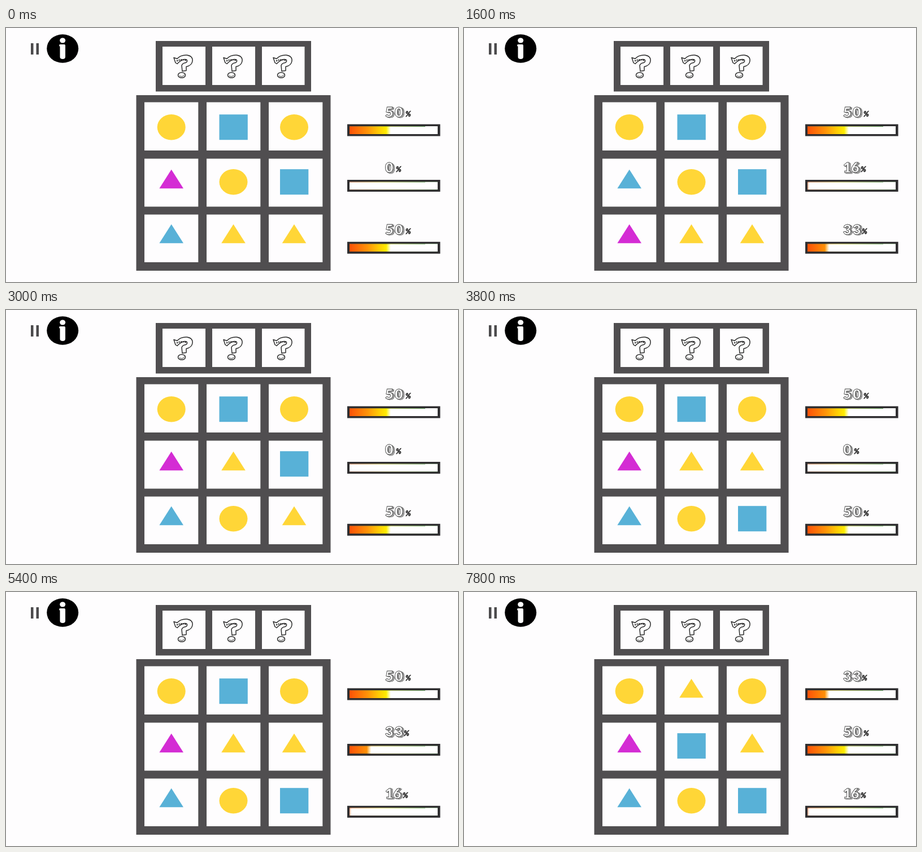
An HTML page for the animation above (8000 ms loop, 800x450 px).

```html
<!DOCTYPE html>
<html lang="en">
<head>
<meta charset="utf-8">
<title>Shape puzzle</title>
<style>
  html, body { margin: 0; width: 100%; height: 100%; overflow: hidden; background: #fefdfe; }
  svg { display: block; width: 800px; height: 450px; }
  .digit { font: 900 25px Lato, "Open Sans", sans-serif; stroke: #4a4a4a; stroke-width: .9px; fill: #fff; }
  .side { fill: #ddd; stroke: #666; stroke-width: .7px; }
  .sign { font: italic 900 12.5px Lato, "Open Sans", sans-serif; fill: #222; stroke: #222; stroke-width: .3px; }
  .ink { fill: #fff; stroke: #2c2c2c; stroke-width: 1.5px; stroke-linejoin: round; }
  .hatch { fill: none; stroke: #333; stroke-width: 2px; stroke-dasharray: 2.4 1.3; }
</style>
</head>
<body>
<svg id="stage" viewBox="0 0 800 450">
  <defs>
    <linearGradient id="heat" gradientUnits="userSpaceOnUse" x1="608" x2="764" y1="0" y2="0">
      <stop offset="0" stop-color="#fc5208"/>
      <stop offset=".2" stop-color="#ff9208"/>
      <stop offset=".33" stop-color="#ffca05"/>
      <stop offset=".43" stop-color="#fff200"/>
      <stop offset=".6" stop-color="#c8ee20"/>
      <stop offset="1" stop-color="#20a020"/>
    </linearGradient>
    <linearGradient id="fade">
      <stop offset="0" stop-color="#fff" stop-opacity="0"/>
      <stop offset=".04" stop-color="#fff"/>
    </linearGradient>
    <linearGradient id="rim" gradientUnits="userSpaceOnUse" x1="608" x2="744" y1="0" y2="0">
      <stop offset="0" stop-color="#c85a20"/>
      <stop offset=".4" stop-color="#b9b41c"/>
      <stop offset="1" stop-color="#1f7a1f"/>
    </linearGradient>
    <g id="query">
      <path class="ink" d="M-17 -15L-11 -13Q-5 -20 6 -19.5Q17 -18 16 -9Q15 -1 5 1L5 8L-2 9L-3 -1Q-2 -5 4 -6Q8 -8 6 -11Q1 -14 -8 -7L-11 -4L-14 -6Z"/>
      <path class="hatch" d="M-12 -9Q-4 -13 5 -10"/>
      <ellipse class="ink" cx="-3" cy="16" rx="6.5" ry="4.8"/>
      <path d="M-7 17Q-2 21 2 15" fill="none" stroke="#2c2c2c"/>
    </g>
  </defs>
</svg>
<script>
const LOOP = 8000, LAG = 200;
const COLORS = { y: '#ffd637', b: '#58b1d7', m: '#d42cd4' };
const COLS = [292.7, 402.5, 510], ROWS = [175.7, 272.7, 369.7], BARS = [181, 279.5, 389.3];
const START = ['yC', 'bS', 'yC', 'mT', 'yC', 'bS', 'bT', 'yT', 'yT'];
const SECRET = ['bC', 'mS', 'yT'];
const SWAPS = [[800, 3, 6], [2000, 3, 6], [2800, 4, 7], [3800, 5, 8], [5800, 1, 4]];
const ADVANCE = { 0: 20, 1: 14, 3: 17, 5: 17, 6: 18 };
const FILL_END = { 0: 598, 16: 611.5, 33: 646.5, 50: 681 };

const stage = document.getElementById('stage');

function add(parent, tag, attrs, text) {
  const el = document.createElementNS('http://www.w3.org/2000/svg', tag);
  for (const key in attrs) el.setAttribute(key, attrs[key]);
  if (text !== undefined) el.textContent = text;
  parent.appendChild(el);
  return el;
}

function box(parent, x1, y1, x2, y2, fill) {
  return add(parent, 'rect', { x: x1, y: y1, width: x2 - x1, height: y2 - y1, fill });
}

// Pause and info buttons
box(stage, 44, 27, 48.5, 47, '#4b4a4c');
box(stage, 53.5, 27, 58, 47, '#4b4a4c');
add(stage, 'ellipse', { cx: 100.2, cy: 36.5, rx: 28, ry: 25.3, fill: '#000' });
add(stage, 'ellipse', { cx: 100.2, cy: 22, rx: 5, ry: 4.5, fill: '#fff' });
add(stage, 'path', { d: 'M95 29H103Q105 29 105 31V51Q105 55 100.2 55Q95.5 55 95.5 51V33Q93 31 95 29Z', fill: '#fff' });

// Hidden answer and board
box(stage, 265, 23, 540, 112.5, '#504e50');
[277, 365, 453].forEach((x, i) => {
  box(stage, x, 33, x + 76 - (i === 2 ? .5 : 0), 101, '#fefdfe');
  add(stage, 'use', { href: '#query', x: x + 37, y: 67.5 });
});
box(stage, 230.5, 119, 574.5, 430, '#504e50');
for (const [top, bottom] of [[131.5, 217], [231.5, 316.5], [330.5, 415]])
  for (const x of [245, 355, 465]) box(stage, x, top, x + 95.3, bottom, '#fefdfe');

const board = add(stage, 'g', {});

const meters = BARS.map((y, i) => {
  box(stage, 604, y - 10.5, 768.5, y + 10.5, '#2f2e30');
  const clip = add(stage.querySelector('defs'), 'clipPath', { id: 'bar' + i });
  box(clip, 608, y - 7, 764, y + 7, '#fff');
  const inner = add(stage, 'g', { 'clip-path': `url(#bar${i})` });
  box(inner, 608, y - 7, 764, y + 7, 'url(#heat)');
  const cover = box(inner, 0, y - 7, 200, y + 7, 'url(#fade)');
  add(inner, 'rect', { x: 608, y: y - 7, width: 134, height: 1, fill: 'url(#rim)', opacity: .7 });
  return { cover, label: add(stage, 'g', { transform: `translate(670 ${y - 31.5})` }) };
});

function drawShape(code, x, y) {
  const fill = COLORS[code[0]];
  if (code[1] === 'C') add(board, 'ellipse', { cx: x, cy: y, rx: 25, ry: 22.7, fill });
  else if (code[1] === 'S') box(board, x - 25, y - 22.5, x + 25.3, y + 22.5, fill);
  else add(board, 'path', { d: `M${x} ${y - 22}l21.3 33.5h-42.6z`, fill });
}

function drawLabel(label, value) {
  label.replaceChildren();
  let x = 0;
  for (const d of String(value)) {
    for (let k = 3; k > 0; k--) add(label, 'text', { class: 'digit side', x: x + 1 + k, y: 8 + k * .5 }, d);
    add(label, 'text', { class: 'digit', x: x + 1, y: 8 }, d);
    x += ADVANCE[d];
  }
  add(label, 'text', { class: 'sign', x, y: 7.3 }, '%');
}

function cellsAt(t) {
  const cells = START.slice();
  for (const [at, a, b] of SWAPS)
    if (t >= at) [cells[a], cells[b]] = [cells[b], cells[a]];
  return cells;
}

// One hit for each matching colour and each matching shape
function score(row) {
  let hits = 0;
  row.forEach((c, i) => { hits += (c[0] === SECRET[i][0]) + (c[1] === SECRET[i][1]); });
  return Math.floor(hits * 100 / 6);
}

let shown = '';
function render(t) {
  const cells = cellsAt(t), rated = cellsAt(t - LAG);
  const key = cells + '|' + rated;
  if (key === shown) return;
  shown = key;
  board.replaceChildren();
  cells.forEach((c, i) => drawShape(c, COLS[i % 3], ROWS[Math.floor(i / 3)]));
  meters.forEach(({ cover, label }, i) => {
    const value = score(rated.slice(i * 3, i * 3 + 3));
    cover.setAttribute('x', FILL_END[value] - 8);
    drawLabel(label, value);
  });
}

const begin = performance.now();
function tick() {
  render((performance.now() - begin) % LOOP);
  requestAnimationFrame(tick);
}
tick();
</script>
</body>
</html>
```
